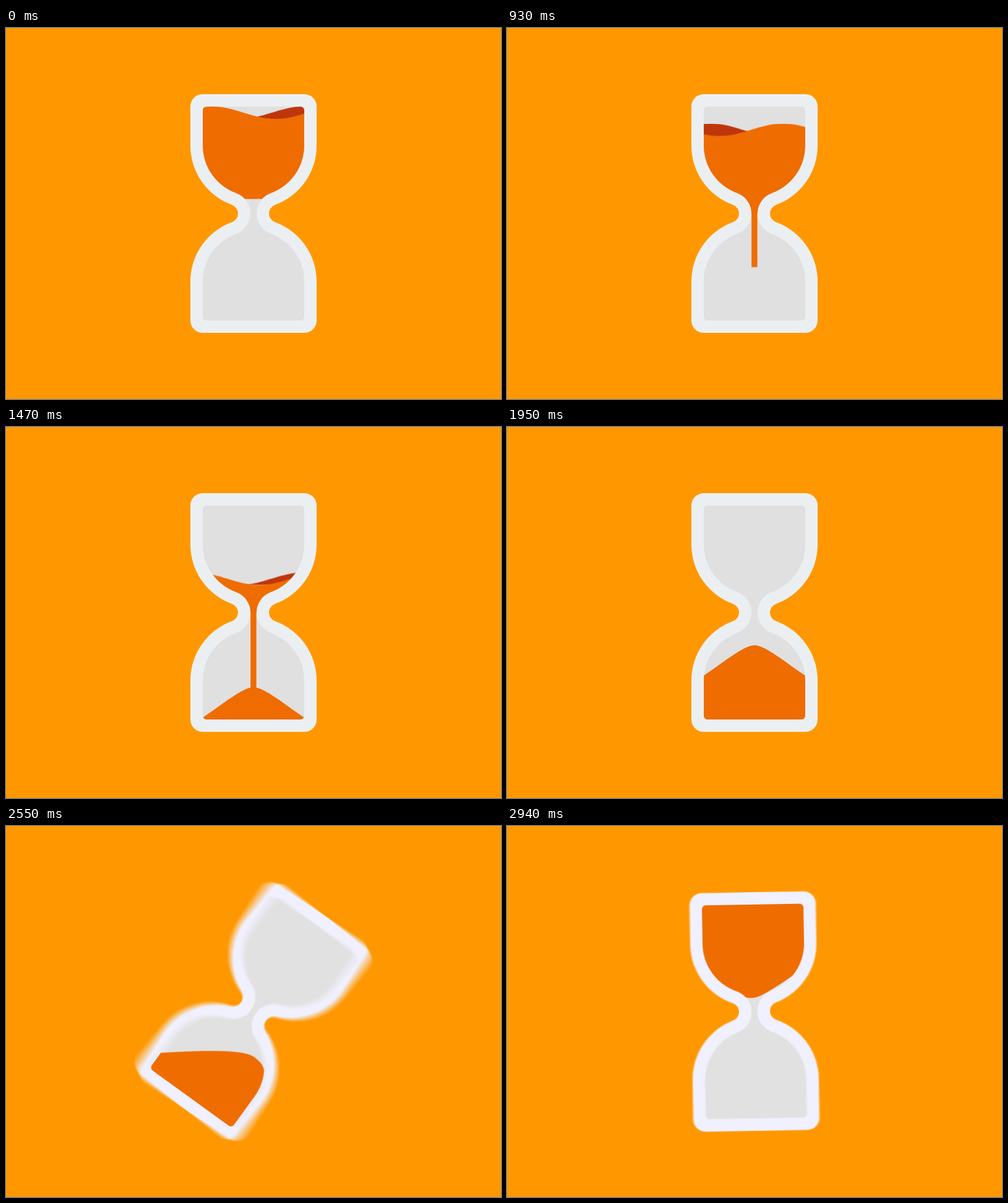
An HTML page without scripts that plays this animation: 800x600 px, repeating every 2970 ms.

```html
<!DOCTYPE html>
<html lang="en">
<head>
<meta charset="utf-8">
<title>Hourglass</title>
<style>
  html, body { margin: 0; width: 100%; height: 100%; overflow: hidden; background: #ff9800; }
  svg { display: block; width: 100vw; height: 100vh; }

  .spin, .smear use, .trail, .level, .front, .back, .cover, .stream, .pile, .still, .smear, .arc, .tail {
    animation-duration: 2970ms;
    animation-iteration-count: infinite;
    animation-timing-function: linear;
  }
  .spin, .smear use, .trail { transform-origin: 400px 300px; }

  .sand { fill: #ef6c00; }
  .dark { fill: #bf360c; }
  .air { fill: #e0e0e0; }

  /* flow */
  .level { animation-name: level; }
  @keyframes level {
    0% { transform: translateY(0); animation-timing-function: cubic-bezier(.33, .07, .67, .34); }
    18.18% { transform: translateY(8px); animation-timing-function: cubic-bezier(.33, .2, .67, .54); }
    31.31% { transform: translateY(27.5px); animation-timing-function: cubic-bezier(.33, .28, .67, .6); }
    36.36% { transform: translateY(40px); animation-timing-function: cubic-bezier(.33, .19, .67, .43); }
    49.49% { transform: translateY(108px); animation-timing-function: cubic-bezier(.33, .22, .67, .56); }
    54.55%, 100% { transform: translateY(176px); }
  }
  .front { --run: 200px; animation-name: drift; }
  .back { --run: 460px; animation-name: drift; }
  @keyframes drift {
    0% { transform: translateX(0); }
    55.56%, 100% { transform: translateX(var(--run)); }
  }
  .cover { animation-name: pour; }
  @keyframes pour {
    0% { transform: translateY(0); animation-timing-function: cubic-bezier(.33, .07, .67, .34); }
    18.18% { transform: translateY(29px); animation-timing-function: cubic-bezier(.33, .17, .67, .4); }
    31.31% { transform: translateY(110px); animation-timing-function: cubic-bezier(.33, .2, .67, .54); }
    36.36%, 100% { transform: translateY(200px); }
  }
  .stream { animation-name: drain; }
  @keyframes drain {
    0%, 53.9% { transform: translateY(0); }
    54.55% { transform: translateY(18px); }
    59%, 100% { transform: translateY(190px); }
  }

  /* heap: rises, then sloshes while the glass turns */
  .pile { animation-name: rise, slosh; }
  @keyframes rise {
    0%, 35.35% { transform: translateY(127px); }
    49.49% { transform: translateY(68px); animation-timing-function: cubic-bezier(.45, .5, .7, 1); }
    65.66%, 100% { transform: translateY(0); }
  }
  @keyframes slosh {
    0%, 75.76% {
      d: path("M318 402C350 381 382 353 400 353S450 381 482 402V490H318Z");
      animation-timing-function: ease-in;
    }
    85.86% { d: path("M318 442C355 412 420 358 445 359S470 368 482 385V490H318Z"); }
    90.91% { d: path("M318 458C350 429 420 367 455 357S475 362 482 366V490H318Z"); }
    98.99% { d: path("M318 370C340 358 385 322 403 322S425 330 482 345V490H318Z"); }
    100% { d: path("M318 345C340 324 385 324 400 324S460 324 482 345V490H318Z"); }
  }

  /* turn */
  .spin { animation-name: spin; }
  @keyframes spin {
    0%, 75.76% { transform: rotate(0deg); animation-timing-function: cubic-bezier(.6, 0, .8, .24); }
    85.86% { transform: rotate(35.5deg); animation-timing-function: cubic-bezier(.4, .23, .6, .8); }
    90.91% { transform: rotate(153deg); animation-timing-function: cubic-bezier(.2, .35, .6, .9); }
    100% { transform: rotate(180deg); }
  }
  .still { animation-name: still; animation-timing-function: step-end; }
  @keyframes still {
    0% { visibility: visible; }
    76%, 100% { visibility: hidden; }
  }
  .smear { isolation: isolate; animation-name: moving; animation-timing-function: step-end; }
  @keyframes moving {
    0% { visibility: hidden; }
    76%, 100% { visibility: visible; }
  }
  .smear use { opacity: calc(1 / 15); mix-blend-mode: plus-lighter; animation-name: smear; }
  @keyframes smear {
    0%, 75.76% { transform: rotate(0deg); animation-timing-function: ease-in; }
    85.86% { transform: rotate(calc(var(--n) * .48deg)); }
    88.4% { transform: rotate(calc(var(--n) * .8deg)); }
    90.91% { transform: rotate(calc(var(--n) * .48deg)); }
    93.94% { transform: rotate(calc(var(--n) * .2deg)); }
    98.99% { transform: rotate(calc(var(--n) * .1deg)); }
    100% { transform: rotate(0deg); }
  }

  /* speed lines */
  .trail { animation-name: trail; }
  @keyframes trail {
    0%, 83.84% { transform: rotate(-146deg); }
    85.86% { transform: rotate(-127.6deg); }
    90.91% { transform: rotate(-41deg); }
    94.95%, 100% { transform: rotate(20deg); }
  }
  .arc { fill: none; stroke: url(#fade); animation-name: swell; }
  @keyframes swell {
    0%, 83.84% { stroke-width: 0; }
    85.86% { stroke-width: 1.8px; }
    90.91% { stroke-width: var(--w); }
    94.95%, 100% { stroke-width: 0; }
  }
  .tail { stop-color: #fff; animation-name: tail; }
  @keyframes tail {
    0%, 85.86% { stop-opacity: 1; }
    90.91%, 100% { stop-opacity: 0; }
  }
</style>
</head>
<body>
<svg viewBox="0 0 800 600">
  <defs>
    <path id="inner" d="M324 127H476a6 6 0 0 1 6 6V190A82 82 0 0 1 428 267.1A35 35 0 0 0 428 332.9A82 82 0 0 1 482 410V467a6 6 0 0 1-6 6H324a6 6 0 0 1-6-6V410A82 82 0 0 1 372 332.9A35 35 0 0 0 372 267.1A82 82 0 0 1 318 190V133a6 6 0 0 1 6-6Z"/>
    <g id="glass">
      <path fill="#eceff1" d="M318 107H482a20 20 0 0 1 20 20V190A102 102 0 0 1 434.9 285.9A15 15 0 0 0 434.9 314.1A102 102 0 0 1 502 410V473a20 20 0 0 1-20 20H318a20 20 0 0 1-20-20V410A102 102 0 0 1 365.1 314.1A15 15 0 0 0 365.1 285.9A102 102 0 0 1 298 190V127a20 20 0 0 1 20-20Z"/>
      <use href="#inner" class="air"/>
    </g>
    <clipPath id="inside"><use href="#inner"/></clipPath>
    <clipPath id="upper"><rect width="800" height="300"/></clipPath>
    <linearGradient id="fade" gradientUnits="userSpaceOnUse" x1="0" y1="300" x2="0" y2="334">
      <stop class="tail" offset="0"/>
      <stop offset="1" stop-color="#fff"/>
    </linearGradient>
    <!-- 88 degree arcs starting on the right, running clockwise -->
    <g id="arcs">
      <path class="arc" style="--w:15px" d="M563.5 300A163.5 163.5 0 0 1 405.7 463.4"/>
      <path class="arc" style="--w:12px" d="M525 300A125 125 0 0 1 404.4 424.9"/>
    </g>
  </defs>

  <rect width="800" height="600" fill="#ff9800"/>

  <g class="trail">
    <use href="#arcs"/>
    <use href="#arcs" transform="rotate(180 400 300)"/>
  </g>

  <g class="spin">
    <use class="still" href="#glass"/>
    <g class="smear">
      <use href="#glass" style="--n:-7"/>
      <use href="#glass" style="--n:-6"/>
      <use href="#glass" style="--n:-5"/>
      <use href="#glass" style="--n:-4"/>
      <use href="#glass" style="--n:-3"/>
      <use href="#glass" style="--n:-2"/>
      <use href="#glass" style="--n:-1"/>
      <use href="#glass" style="--n:0"/>
      <use href="#glass" style="--n:1"/>
      <use href="#glass" style="--n:2"/>
      <use href="#glass" style="--n:3"/>
      <use href="#glass" style="--n:4"/>
      <use href="#glass" style="--n:5"/>
      <use href="#glass" style="--n:6"/>
      <use href="#glass" style="--n:7"/>
    </g>

    <g class="still" clip-path="url(#inside)">
      <g clip-path="url(#upper)">
        <g class="level">
          <path class="back dark" d="M-340 127c37 0 65 20 102.5 20s65-20 102.5-20s65 20 102.5 20s65-20 102.5-20s65 20 102.5 20s65-20 102.5-20s65 20 102.5 20s65-20 102.5-20s65 20 102.5 20s65-20 102.5-20V147H-340Z"/>
          <path class="front sand" d="M-77 127c37 0 65 20 102.5 20s65-20 102.5-20s65 20 102.5 20s65-20 102.5-20s65 20 102.5 20s65-20 102.5-20V330H-77Z"/>
        </g>
      </g>
      <rect class="stream sand" x="395.2" y="299" width="9.4" height="182"/>
      <rect class="cover air" x="310" y="276.5" width="180" height="210"/>
    </g>
    <g clip-path="url(#inside)">
      <path class="pile sand" d="M318 402C350 381 382 353 400 353S450 381 482 402V490H318Z"/>
    </g>
  </g>
</svg>
</body>
</html>
```
